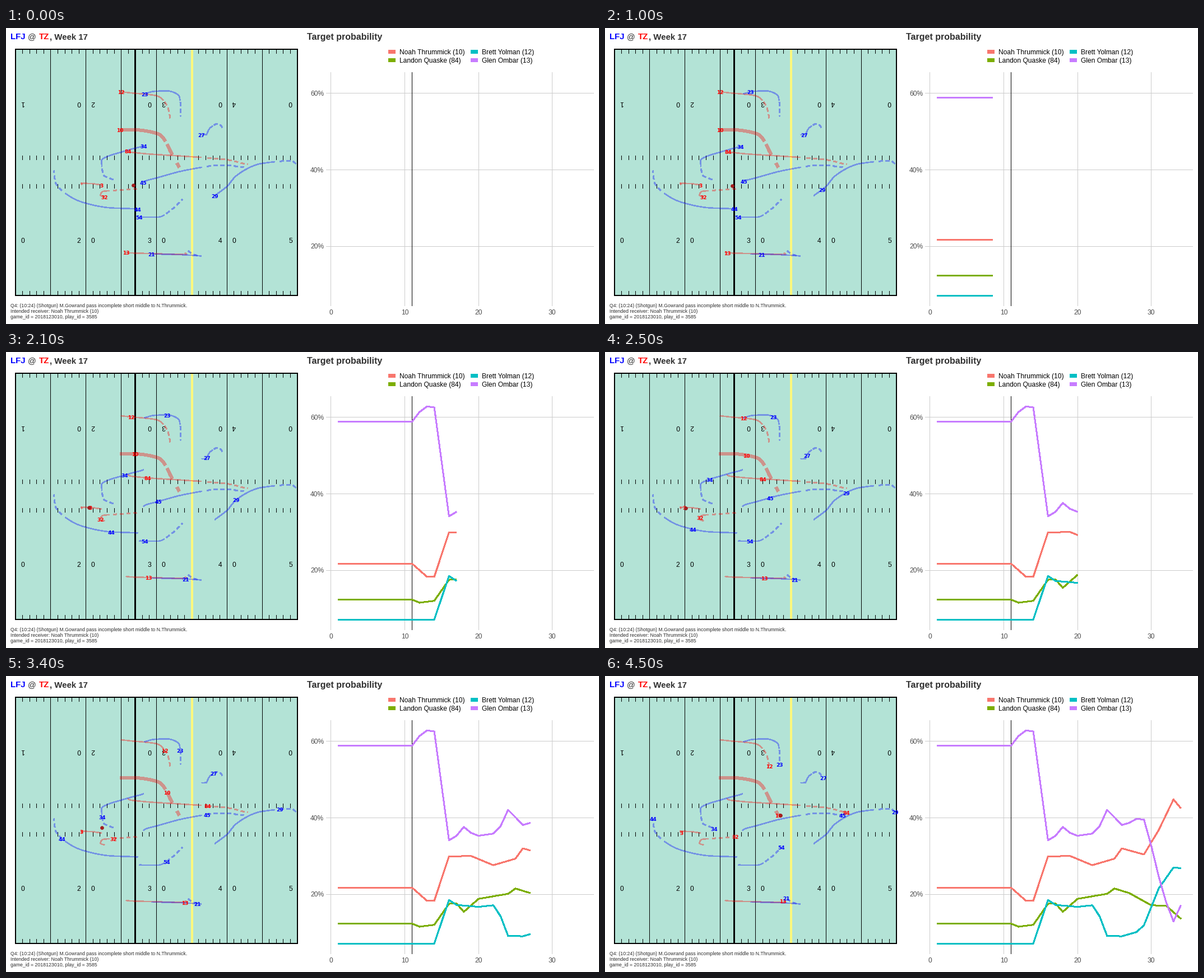
These frames come from a looping animation (1058x529 px, 5.4 s). A matplotlib script:

```python
import numpy as np
import matplotlib.pyplot as plt
from matplotlib.animation import FuncAnimation
from matplotlib.patches import Rectangle

W, H, DPI = 1058, 529, 64
PT = 72 / DPI  # points per pixel
RED, BLUE, DARK = "#ff0000", "#0000ff", "#303030"
LEFT, RIGHT, TOP, BOTTOM = 17, 520, 38, 478
YARD = (RIGHT - LEFT) / 40
SNAP, THROW, LAST_CHART, LAST = 11, 26, 34, 35
STEPS = 45  # animation steps before the final hold
KEY_TIMES = (1, 12, 17, 23, 30, 35)

# Samples are spread over the steps, so about every third takes a half step too
SLOW = {2, 5, 8, 13, 16, 19, 22, 26, 29, 31, 34}
CLOCK = [t for f in range(1, LAST)
         for t in ((f, f + 0.5) if f in SLOW else (f,))] + [LAST]

fig = plt.figure(figsize=(W / DPI, H / DPI), dpi=DPI, facecolor="white")
ax = fig.add_axes([0, 0, 1, 1])
ax.set_xlim(0, W)
ax.set_ylim(H, 0)
ax.axis("off")


def glide(points, t):
    """Smooth monotone path through points; a missing first one means waiting."""
    v = np.array(points, float)
    knots = np.array(KEY_TIMES[-len(v):], float)
    t = np.clip(np.atleast_1d(t), knots[0], knots[-1])
    slope = np.diff(v, axis=0) / np.diff(knots)[:, None]
    a, b = slope[:-1], slope[1:]
    same = a * b > 0
    inner = np.where(same, 2 * a * b / np.where(same, a + b, 1), 0)
    m = np.concatenate([slope[:1], inner, slope[-1:]])
    i = np.clip(np.searchsorted(knots, t, side="right") - 1, 0, len(v) - 2)
    h = (knots[i + 1] - knots[i])[:, None]
    u = (t - knots[i])[:, None] / h
    p = ((1 + 2 * u) * (1 - u) ** 2 * v[i] + u * (1 - u) ** 2 * h * m[i]
         + u * u * (3 - 2 * u) * v[i + 1] + u * u * (u - 1) * h * m[i + 1])
    return p.T


def stroke(xs, ys, color="black", width=1.0, z=2, **kw):
    return ax.plot(xs, ys, color=color, lw=width * PT, zorder=z, snap=False,
                   antialiased=False, solid_capstyle="butt",
                   dash_capstyle="butt", **kw)[0]


def vline(x, y0, y1, color="black", **kw):
    stroke([np.floor(x) + 0.5] * 2, [y0, y1], color, **kw)


def hline(y, x0, x1, color="black", **kw):
    stroke([x0, x1], [np.floor(y) + 0.5] * 2, color, **kw)


def write(x, y, s, px, color="black", ha="left", rot=0,
          font="Liberation Sans", weight="normal", z=6):
    """Text whose capital letters are centred on y."""
    dy = -0.36 * px if rot else 0.36 * px
    return ax.text(x, y + dy, s, fontsize=px * PT, color=color, ha=ha,
                   va="baseline", rotation=rot, rotation_mode="anchor",
                   family=font, weight=weight, zorder=z)


# Titles and caption
write(8, 15, "LFJ", 15, BLUE, weight="bold")
write(39, 15, "@", 14.5, DARK)
write(59, 15, "TZ", 15, RED, weight="bold")
write(78, 15, ", Week 17", 15, DARK, weight="bold")
write(537, 15, "Target probability", 16, DARK, weight="bold")
CAPTION = ("Q4: (10:24) (Shotgun) M.Gowrand pass incomplete short middle to N.Thrummick.",
           "Intended receiver: Noah Thrummick (10)",
           "game_id = 2018123010, play_id = 3585")
for row, line in enumerate(CAPTION):
    write(8, 496 + 10 * row, line, 8.75, DARK)

# Field
field = ax.add_patch(Rectangle((LEFT, TOP), RIGHT - LEFT, BOTTOM - TOP,
                               fc="#b3e3d6", ec="none", zorder=1))
ax.add_patch(Rectangle((LEFT, TOP), RIGHT - LEFT, BOTTOM - TOP, fc="none",
                       ec="black", lw=2 * PT, snap=False, zorder=4))
for yard in range(1, 40):
    x = LEFT + yard * YARD
    if yard % 5 == 0:
        vline(x, TOP, BOTTOM)
    else:
        for y in (TOP, 228, 279, BOTTOM - 8):
            vline(x, y, y + 8)
vline(230, TOP, BOTTOM, width=3)
stroke([332, 332], [TOP, BOTTOM], "#fcf87c", 4, z=3)
for i, (upper, lower) in enumerate(zip("10203040", "02030405")):
    x = LEFT + YARD * (1 + 10 * (i // 2) + (8 if i % 2 else 0))
    write(x, 135, upper, 12, ha="center", rot=180, z=3)
    write(x, 380, lower, 12, ha="center", z=3)

runners = []


def runner(number, color, *points, width=1.5):
    """Draw a route, dashed after the throw, and keep its moving label."""
    for start, end, style in ((1, THROW, "-"), (THROW + 1, LAST, (0, (4, 3.5)))):
        xs, ys = glide(points, np.linspace(start, end, 120))
        stroke(xs, ys, color, width, z=3.5, alpha=0.35, linestyle=style)
    tag = write(0, 0, str(number), 9, color, "center",
                font="DejaVu Sans", weight="bold")
    tag.set_clip_path(field)
    runners.append((tag, points))


runner(12, RED, (205, 114), (223, 116), (270, 121.5), (289, 143), (293, 161))
runner(10, RED, (203, 182), (207, 182), (230, 182), (273, 190), (296, 225),
       (309, 249), width=5)
runner(84, RED, (217.5, 219.5), (221, 221.5), (252.5, 225), (315, 229),
       (391, 235), (431, 244))
runner(32, RED, (176, 302), (168.5, 299), (172, 292.5), (210.5, 289), (233, 287))
runner(3, RED, (170.5, 280.5), (151, 278), (136, 277.5), (134, 277.5), (136, 280))
runner(13, RED, (214, 401), (222, 402), (254, 403), (308, 404.5), (322, 404),
       (317, 401.5))
runner(23, BLUE, (247, 117.5), (267, 113), (288, 112.5), (309, 122),
       (311.5, 142), (311, 158))
runner(27, BLUE, (349, 191), (357.5, 190.5), (358.5, 189), (363, 180),
       (378.5, 171), (389.5, 182))
runner(34, BLUE, (245.5, 210.5), (239.5, 212.5), (211.5, 220), (170.5, 237),
       (173.5, 262), (195, 272.5))
runner(45, BLUE, (245, 276), (250, 273), (272, 267), (321.5, 254), (386, 245),
       (424, 249))
runner(29, BLUE, (372.5, 299.5), (395, 282.5), (411, 264), (454, 242.5),
       (507.5, 237), (518, 243))
runner(44, BLUE, (235, 323.5), (228, 323), (188, 321.5), (128.5, 308.5),
       (88, 275), (85.5, 255))
runner(54, BLUE, (238, 337.5), (247.5, 338), (271, 338), (297.5, 323), (315, 306))
runner(21, BLUE, (260, 404), (291.5, 404.5), (320.5, 405.5), (348, 407.5),
       (334, 404.5), (323.5, 397))

# Ball: snapped, held, thrown in a straight line, dropped
BALL_T, BALL_X, BALL_Y = zip((1, 227, 281), (9, 227, 282), (12, 179.5, 279),
                             (17, 147.5, 278), (THROW, 137, 280),
                             (31, 305, 234), (LAST, 313, 249))
ball, = ax.plot([], [], "o", ms=6 * PT, mfc="#a81e1e", mec="#8f1414",
                mew=0.6, zorder=7)


# Chart
def chart_x(sample):
    return 579.8 + 13.165 * sample


def chart_y(percent):
    return 116.8 + (60 - percent) * 6.83


for percent in (20, 40, 60):
    hline(chart_y(percent), 571, 1049, "#cccccc")
    write(567, chart_y(percent), f"{percent}%", 12, "#4d4d4d", "right")
for sample in (0, 10, 20, 30):
    vline(chart_x(sample), 79, 497, "#cccccc")
    write(chart_x(sample), 507.5, str(sample), 12, "#4d4d4d", "center")
vline(chart_x(SNAP), 79, 497, z=3)

SAMPLES = np.arange(1, LAST_CHART + 1)


def trend(*turns):
    """Straight runs between (sample, percent) turning points."""
    return np.interp(SAMPLES, *zip(*turns))


noah = trend((SNAP, 21.7), (13, 18.3), (14, 18.3), (16, 29.9), (19, 30),
             (22, 27.6), (25, 29.3), (26, 32), (29, 30.4), (31, 36.8),
             (33, 44.8), (34, 42.5))
landon = trend((SNAP, 12.3), (12, 11.5), (14, 12), (16, 17.5), (17, 17.6),
               (18, 15.4), (20, 18.8), (24, 20.1), (25, 21.5), (27, 20.3),
               (30, 17.1), (32, 17), (34, 13.6))
brett = trend((14, 7.1), (16, 18.5), (17, 17.2), (20, 16.7), (22, 17.1),
              (23, 14.2), (24, 9.1), (26, 9), (28, 10.1), (29, 11.9),
              (31, 21.5), (33, 27), (34, 26.8))
glen = 100 - noah - landon - brett  # the four shares make a whole

curves = []
for i, (name, color, share) in enumerate((
        ("Noah Thrummick (10)", "#F8766D", noah),
        ("Landon Quaske (84)", "#7CAE00", landon),
        ("Brett Yolman (12)", "#00BFC4", brett),
        ("Glen Ombar (13)", "#C77CFF", glen))):
    x, y = 682 + 147 * (i // 2), 43 + 15 * (i % 2)
    ax.add_patch(Rectangle((x, y - 4), 13, 7, fc=color, ec="none",
                           antialiased=False))
    write(x + 20, y, name, 12)
    curves.append((stroke([], [], color, 2, z=4), chart_y(share)))


def update(step):
    t = CLOCK[min(step, STEPS)]
    for tag, points in runners:
        (x,), (y,) = glide(points, t)
        tag.set_position((x, y + 1 + 0.36 * 9))
    ball.set_data([np.interp(t, BALL_T, BALL_X)], [np.interp(t, BALL_T, BALL_Y)])
    end = min(t, LAST_CHART)
    shown = np.append(SAMPLES[SAMPLES < end], end)
    for line, ys in curves:
        line.set_data(chart_x(shown), np.interp(shown, SAMPLES, ys))
    return []


anim = FuncAnimation(fig, update, frames=54, interval=100, repeat=True,
                     repeat_delay=0, blit=False, init_func=lambda: update(0))
plt.show()
```
